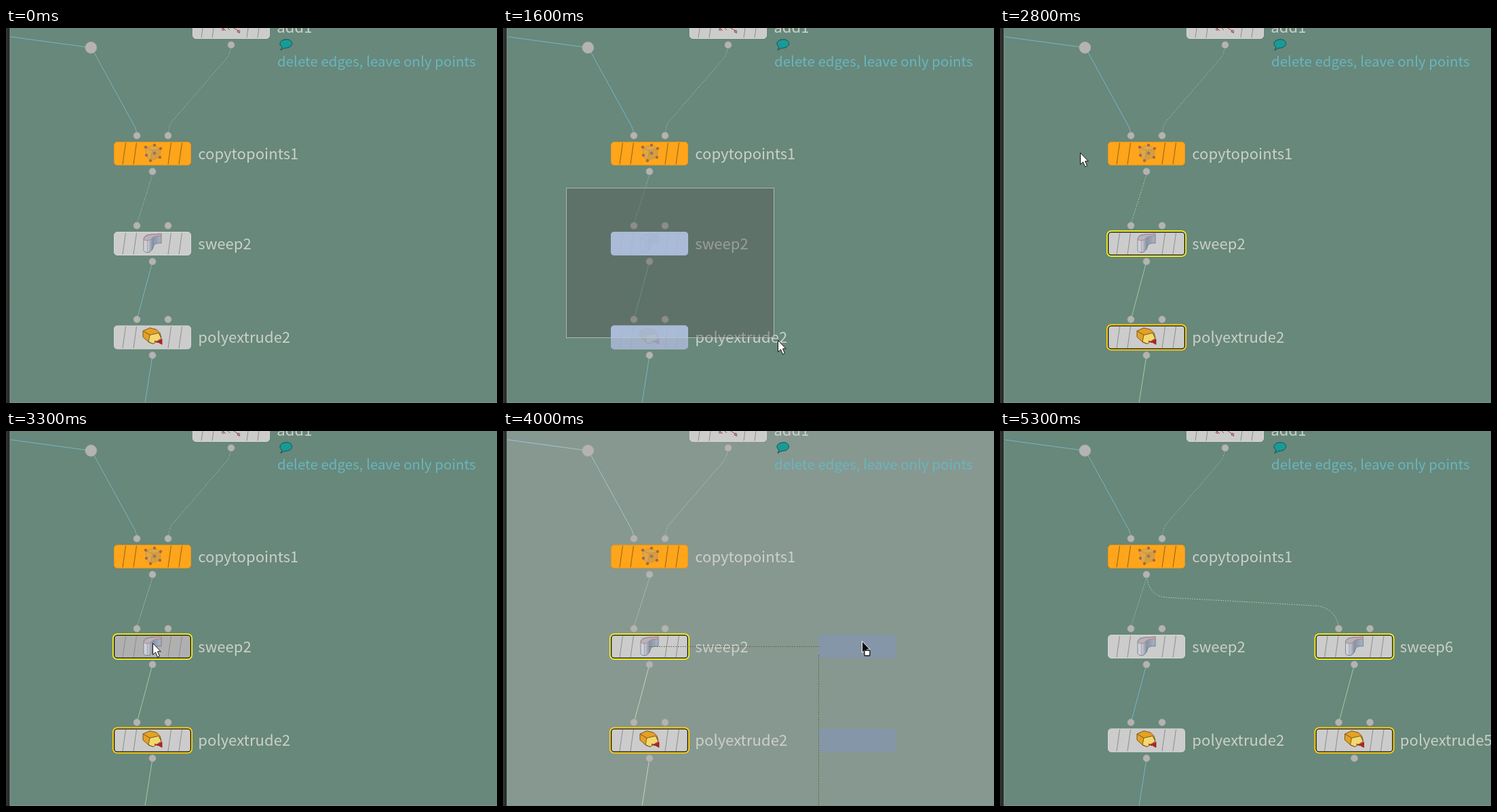
These frames come from a looping animation (724 px wide and 554 px high, 6.3 s). An HTML page:

```html
<!DOCTYPE html>
<html lang="en">
<head>
<meta charset="utf-8">
<title>Copying nodes in a network</title>
<style>
  html, body { margin: 0; width: 100%; height: 100%; overflow: hidden; background: #67887a; }
  svg { display: block; width: 724px; height: 554px; }
  text { font: 22.12px "Noto Sans CJK JP", "Noto Sans CJK SC", "Noto Sans CJK", "Noto Sans", sans-serif; fill: #cdcfca; white-space: pre; }
  .comment { font-size: 20.54px; fill: #6ab5c0; }
  .wire { fill: none; stroke-width: 1; }
  .dotted { stroke-dasharray: 1.6 1.9; }
</style>
</head>
<body>
<svg viewBox="0 0 724 554" xmlns="http://www.w3.org/2000/svg">
  <defs>
    <linearGradient id="edge"><stop stop-color="#353535"/><stop offset="1" stop-color="#252727"/></linearGradient>
    <linearGradient id="sheet"><stop stop-color="#d5d9df"/><stop offset=".25" stop-color="#c3c9d2"/><stop offset=".5" stop-color="#8792a4"/><stop offset="1" stop-color="#a9b4c3"/></linearGradient>

    <!-- Icons use the top left corner of their node as origin -->
    <g id="copytopoints" stroke-linejoin="round">
      <path d="M47 9L60 5 69 11 68 23 54 28 48 21Z" fill="#dfa648" stroke="#cc943f"/>
      <path d="M47 9L57 13 69 11M57 13L54 28" fill="none" stroke="#c48d3c"/>
      <path d="M57 13L69 11 68 23 54 28Z" fill="#cf973f" opacity=".6"/>
      <g fill="#a07060" stroke="#7d5138" stroke-width=".6">
        <circle cx="47" cy="8" r="1.7"/><circle cx="60" cy="5" r="1.7"/><circle cx="69" cy="10" r="1.7"/>
        <circle cx="48" cy="20" r="1.7"/><circle cx="60" cy="17" r="1.8" fill="#9a7ba0"/>
        <circle cx="68" cy="23" r="1.7"/><circle cx="54" cy="28" r="1.7"/>
      </g>
    </g>
    <g id="sweep" stroke-linejoin="round">
      <path d="M44 11Q44 4 56 4L70 3V17Q62 16 59 20 58 27 53 30 47 32 44 28Z" fill="url(#sheet)" stroke="#697485" stroke-width=".8"/>
      <path d="M44 11Q45 5 56 4L70 3V6Q60 6 57 9 54 13 49 13 45 13 44 11Z" fill="#b3b5be" stroke="#b8747a" stroke-width=".8"/>
      <path d="M49.5 13V30" stroke="#c08a91" stroke-width=".8"/>
    </g>
    <g id="polyextrude" stroke="#6a4c16" stroke-width=".9" stroke-linejoin="round">
      <path d="M43 8L53 3.5 63 6 68 11 70 18 58 27 52 25 43 17Z" fill="#e5a126"/>
      <path d="M53 14L66 11 70 19 58 27 51 24Z" fill="#f3d86f"/>
      <path d="M43 8L53 14" fill="none"/>
      <path d="M60 23L65 25" stroke="#b02020" stroke-width="1.6"/>
      <path d="M64 24L71 20V28Z" fill="#c01c1c" stroke="#7d1515" stroke-width=".7"/>
    </g>
    <g id="add" fill="none" stroke="#96514c" stroke-width="1">
      <path d="M43 18L49 23M58 17L67 23 70 27M51 18L55 22"/>
      <circle cx="45" cy="21" r="1.5"/><circle cx="68" cy="24" r="1.8"/>
    </g>
    <path id="arrow" d="M0 0V17L4 13.4L7 20.5L10 19.2L7 12.3H11.7Z" stroke-linejoin="round"/>
    <clipPath id="marquee"><rect id="marqueeClip"/></clipPath>
  </defs>
  <g id="scene"></g>
</svg>
<script>
const LOOP = 6300, STEP = 100;
const PLAIN = { solid: '#7ab4c8', dotted: '#98c5c8', link: '#a0cca2', feed: '#b4d6b0' };
const VEILED = { solid: '#a0c5d3', dotted: '#b3d2d6', link: '#bcd9b8', feed: '#cbdcc8' };
const NODE = { x: 159, w: 114, h: 35 };
const COPY_DX = 306.5, SWEEP_Y = 301, EXTRUDE_Y = 439.5;
const ORIGIN = { x: 93, y: 236 };
const scene = document.getElementById('scene');
const marqueeClip = document.getElementById('marqueeClip');

// Pointer path: time, x, y
const path = [
  [200, 12, 144], [300, 60, 158], [400, 103, 180], [500, 119, 203], [700, 98, 233],
  [800, 93, 236], [900, 108, 246], [1200, 250, 346], [1500, 368, 421], [1600, 405, 461],
  [1700, 440, 497], [1800, 459, 517], [1900, 459, 517], [2000, 461, 522], [2100, 461, 522],
  [2200, 463, 510], [2400, 409, 449], [2500, 409, 449], [2700, 215, 262], [2800, 118, 184],
  [2900, 96, 171], [3100, 213, 311], [3200, 213, 311], [3300, 216, 313], [3400, 220, 314],
  [3600, 365, 320], [3800, 508, 319], [3900, 529, 317], [4000, 529, 310], [4400, 529, 310],
  [4700, 492, 348], [5100, 492, 348], [5200, 629, 534]
];

function pointerAt(t) {
  if (t < path[0][0] || t > path.at(-1)[0]) return null;
  const i = Math.max(1, path.findIndex(k => k[0] >= t));
  const [t0, x0, y0] = path[i - 1], [t1, x1, y1] = path[i];
  const k = (t - t0) / (t1 - t0);
  return { x: x0 + (x1 - x0) * k, y: y0 + (y1 - y0) * k };
}

const rect = (x, y, w, h, attrs) => `<rect x="${x}" y="${y}" width="${w}" height="${h}" ${attrs}/>`;
const dot = (x, y, r = 5) => `<circle cx="${x}" cy="${y}" r="${r}" fill="#b5b3b2" stroke="#a6a9a5" stroke-width=".7"/>`;
const wire = (d, color, dotted) => `<path d="${d}" class="wire${dotted ? ' dotted' : ''}" stroke="${color}"/>`;
const label = (x, y, s, cls = '') => `<text x="${x}" y="${y}" class="${cls}">${s}</text>`;
const inside = (p, x, y) => p && p.x >= x && p.x <= x + NODE.w && p.y >= y && p.y <= y + NODE.h;

function node({ x = NODE.x, y, icon, name, ring, fill = '#cccccc', edge = '#d8d8d6', line = '#8c8c8c', inputs = true }) {
  const lines = [15, 31, 82, 98].map(d => `M${d + 2.5} 1.5L${d - 2} 33.5`).join('');
  const outline = ring
    ? rect(-1, -1, NODE.w + 2, NODE.h + 2, `rx="6" fill="${ring}" stroke="${ring}" stroke-width="2"`)
    : '';
  const body = ring
    ? rect(.6, .6, NODE.w - 1.2, NODE.h - 1.2, `rx="4.5" fill="${fill}" stroke="#111" stroke-width="1.3"`)
    : rect(.5, .5, NODE.w - 1, NODE.h - 1, `rx="4.5" fill="${fill}" stroke="${edge}"`);
  return `<g transform="translate(${x} ${y})">${outline}${body}
    <path d="${lines}" stroke="${line}" fill="none"/><use href="#${icon}"/>
    ${inputs ? dot(34, -9) + dot(80, -9) : ''}${dot(57, 44)}${label(124.3, 25.7, name)}</g>`;
}

function pair(dx, names, selected, pointer) {
  const x = NODE.x + dx;
  const fill = y => inside(pointer, x, y) ? '#b0b0b0' : '#cccccc';
  return node({ x, y: SWEEP_Y, icon: 'sweep', name: names[0], ring: selected && '#f3ee25', fill: fill(SWEEP_Y) })
    + node({ x, y: EXTRUDE_Y, icon: 'polyextrude', name: names[1], ring: selected && '#ffd00f', fill: fill(EXTRUDE_Y) });
}

function wires(colors, selected, copied) {
  const link = selected ? colors.link : colors.solid;
  let s = wire('M0 12L125 29', colors.solid)
    + wire('M126 29L190 146Q192.5 151 193 159', colors.solid)
    + wire('M332 25Q331 36 326 44L244 139Q240 145 239 159', colors.dotted, true)
    + wire('M216 212Q216 217 214 223L195 283Q193 287 193 292', selected ? colors.feed : colors.dotted, true)
    + wire('M216 345L193 431', link)
    + wire('M216 484L205 554', link);
  if (copied) {
    s += wire('M216 212C218 234 228 245 247 246L462 258C484 258 498 272 499.5 292', colors.feed, true)
      + wire('M522.5 345L499.5 431', colors.link);
  }
  return s;
}

function marquee(p) {
  const w = Math.max(1, Math.round(p.x - 6 - ORIGIN.x)), h = Math.max(1, Math.round(p.y - 4 - ORIGIN.y));
  for (const [k, v] of Object.entries({ ...ORIGIN, width: w, height: h })) marqueeClip.setAttribute(k, v);
  const hit = [SWEEP_Y, EXTRUDE_Y].filter(y => ORIGIN.x + w > NODE.x && ORIGIN.y + h > y);
  const tint = (y, color) => rect(NODE.x, y, NODE.w, NODE.h, `rx="5" fill="${color}"`);
  return rect(ORIGIN.x, ORIGIN.y, w, h, 'fill="rgba(80,80,82,.4)"')
    + `<g opacity=".87">${hit.map(y => tint(y, '#9caeca')).join('')}
      <g clip-path="url(#marquee)">${hit.map(y => tint(y, '#acc0df')).join('')}</g></g>`
    + rect(ORIGIN.x + .5, ORIGIN.y + .5, w, h, 'fill="none" stroke="#c3cbc6" stroke-opacity=".75"');
}

function ghosts(t, p) {
  const snapped = t >= 3900;
  const dx = snapped ? COPY_DX : p.x - 216, dy = snapped ? 0 : p.y - 313;
  let s = [SWEEP_Y, EXTRUDE_Y].map(y =>
    rect(NODE.x + dx + .5, y + dy + .5, 113, 34, 'rx="3" fill="#8496a8"')).join('');
  const guide = d => `<path d="${d}" stroke="#5a6338" stroke-dasharray="1.6 1.9" fill="none"/>`;
  if (snapped) s += guide('M465.5 331V554');
  if (t >= 4000) s += guide('M216 318.5H466');
  return s;
}

function cursor(p, copying) {
  const [fill, stroke] = copying ? ['#0a0a0a', '#fff'] : ['#fff', '#111'];
  const badge = copying ? rect(3.5, 13.5, 8, 8, 'rx="1" fill="#fff" stroke="#111" stroke-width="1.3"') : '';
  return `<g transform="translate(${p.x + .5} ${p.y + .5})"><use href="#arrow" fill="${fill}" stroke="${stroke}"/>${badge}</g>`;
}

function render(t) {
  const p = pointerAt(t);
  const selecting = t >= 900 && t < 2000;
  const dragging = t >= 3400 && t < 4400;
  const selected = t >= 2000 && t < 4400;
  const copied = t >= 4400;
  const hover = selecting || dragging ? null : p;

  scene.innerHTML =
    rect(0, 0, 724, 554, `fill="${dragging ? '#879890' : '#67887a'}"`)
    + wires(dragging ? VEILED : PLAIN, selected, copied)
    + rect(0, 0, 5, 554, 'fill="url(#edge)"')
    + rect(5, 0, 1, 554, 'fill="#55685f"')
    + rect(6, 0, 1, 554, `fill="${dragging ? '#93a49c' : '#789487'}"`)
    + rect(6, 553, 718, 1, 'fill="#77958a"')
    + dot(125.3, 29, 8.5)
    + node({ x: 275, y: -19, icon: 'add', name: 'add1', inputs: false })
    + `<path d="M405 33L407 28C402 25 403 18 412 17 423 16 425 26 416 29 412 30 410 29 405 33Z" fill="#179b98" stroke="#194e4d"/>`
    + label(400, 57, 'delete edges, leave only points', 'comment')
    + node({
        y: 168, icon: 'copytopoints', name: 'copytopoints1', line: '#91610f',
        fill: inside(hover, NODE.x, 168) ? '#e39217' : '#ffa51b', edge: '#f0960f'
      })
    + pair(0, ['sweep2', 'polyextrude2'], selected, hover)
    + (copied ? pair(COPY_DX, ['sweep6', 'polyextrude5'], true, hover) : '')
    + (selecting ? marquee(p) : '')
    + (dragging ? ghosts(t, p) : '')
    + (p ? cursor(p, dragging) : '');
}

const start = performance.now();
let last = -1;
function tick() {
  const t = Math.floor((performance.now() - start) % LOOP / STEP) * STEP;
  if (t !== last) render(last = t);
  requestAnimationFrame(tick);
}
tick();
</script>
</body>
</html>
```
